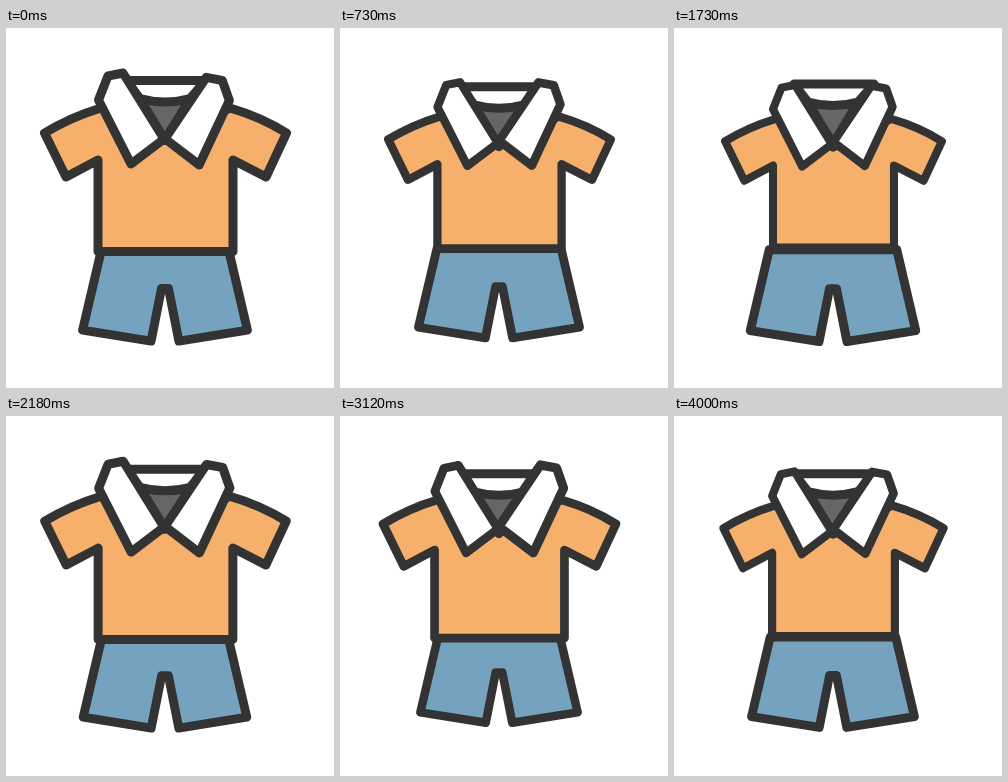
An HTML page for the animation above (4.03 s loop, 328 by 360 pixels).

```html
<!DOCTYPE html>
<html>
<head>
<meta charset="utf-8">
<style>
html, body { margin: 0; width: 100%; height: 100%; overflow: hidden; background: #fff; }
svg { display: block; width: 328px; height: 360px; }
path { stroke: #333; stroke-width: 9; stroke-linejoin: round; stroke-linecap: round; }
</style>
</head>
<body>
<svg viewBox="0 0 328 360">
  <path id="shorts" fill="#75a3bf" d="M95 222H223L242 303L173 314L162.5 261H155.5L145 314L76 303Z"/>
  <path id="shirt" fill="#f6b06c" d="M95 80Q65 89 38.5 105L60 149L92 132V223.5H227V132L260 149L280.5 105Q255 89 224 80L159 112Z"/>
  <g id="back">
    <path fill="#666" d="M134 18H184L159 60Z"/>
    <path fill="#fff" d="M120 0H200L184 18Q159 25 134 18Z"/>
  </g>
  <path id="left" fill="#fff" d="M92.5 72L102 48L117 45L158 111L125 136Z"/>
  <path id="right" fill="#fff" d="M223 73L216 53L200 50L159 111L193 137Z"/>
</svg>
<script>
const LOOP = 4030, PERIOD = 1105;

// Softly rounded triangle wave, +1 at the given peak time
const wave = (t, peak) =>
  Math.asin(.97 * Math.cos(2 * Math.PI * (t - peak) / PERIOD)) / Math.asin(.97);

const transform = (id, value) =>
  document.getElementById(id).setAttribute('transform', value);

// Scale a part about the point x, y
const scale = (id, s, x, y) =>
  transform(id, `translate(${x} ${y}) scale(${s}) translate(${-x} ${-y})`);

function draw(t) {
  const s = 1 - .057 * (1 - wave(t, 0));
  scale('shirt', s, 159.5, 185);
  scale('left', s, 155, 160);
  scale('right', 1 - .075 * (.62 - wave(t, 1000)), 165, 150);
  scale('shorts', 1.004 + .06 * wave(t, 320), 159, 176);
  transform('back', `translate(0 ${53.3 + 6.5 * wave(t, 800)})`);
}

const start = performance.now();
function tick() {
  draw((performance.now() - start) % LOOP);
  requestAnimationFrame(tick);
}
tick();
</script>
</body>
</html>
```
